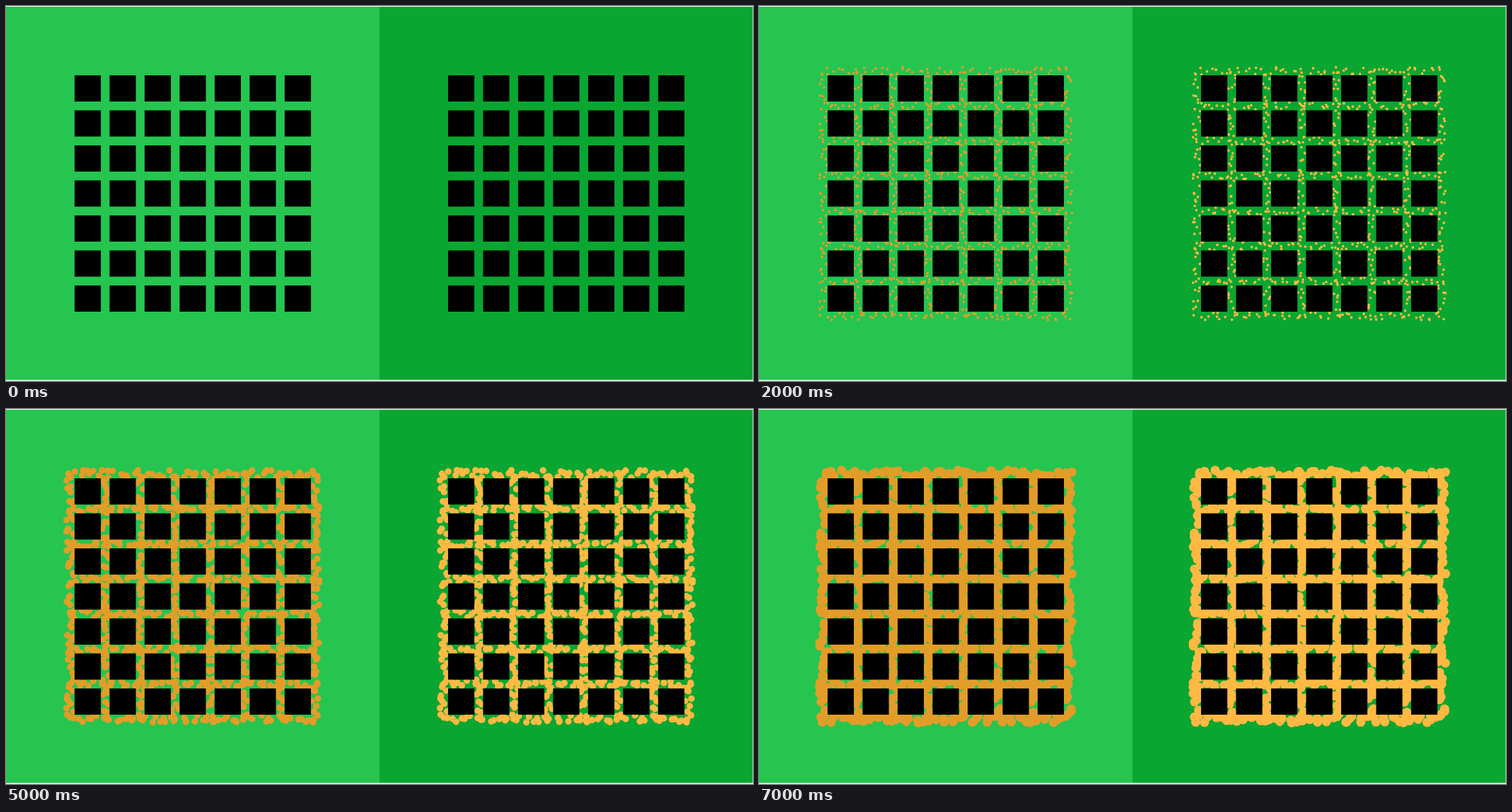
Animation of 1056 by 530 pixels, one loop 8000 ms. Source, as an HTML page:

```html
<!DOCTYPE html>
<html lang="en">
<head>
<meta charset="utf-8">
<title>Dotted grid</title>
<style>
  html, body { margin: 0; width: 100%; height: 100%; overflow: hidden; background: #fff; }
  svg { display: block; width: 100%; height: 100%; }
</style>
</head>
<body>
<svg viewBox="0 0 1056 530">
  <defs>
    <path id="dots" fill="none" stroke-linecap="round"/>
    <path id="squares"/>
  </defs>
  <rect y="1" width="528" height="527.5" fill="#25c550"/>
  <rect x="528" y="1" width="527.5" height="527.5" fill="#09a631"/>
  <use href="#dots" stroke="#e29d29"/>
  <use href="#dots" x="528" stroke="#ffb943"/>
  <use href="#squares"/>
  <use href="#squares" x="528"/>
</svg>
<script>
const CELLS = 7, PITCH = 49.5, SIDE = 37.125;
const LENGTH = CELLS * PITCH;
const LEFT = 264 - LENGTH / 2, TOP = 265 - LENGTH / 2;
const STEP = 1000, STEPS = 8;
const PER_CELL = 9, SPREAD = 5.4, GROWTH = 1.85;

const dots = document.getElementById('dots');
const squares = document.getElementById('squares');

function seeded(seed) {
  return () => {
    seed = (seed + 0x6d2b79f5) | 0;
    let n = Math.imul(seed ^ (seed >>> 15), 1 | seed);
    n = (n + Math.imul(n ^ (n >>> 7), 61 | n)) ^ n;
    return ((n ^ (n >>> 14)) >>> 0) / 4294967296;
  };
}

function squarePath() {
  const inset = (PITCH - SIDE) / 2;
  let d = '';
  for (let row = 0; row < CELLS; row++) {
    for (let col = 0; col < CELLS; col++) {
      const x = LEFT + inset + col * PITCH, y = TOP + inset + row * PITCH;
      d += `M${x} ${y}h${SIDE}v${SIDE}h${-SIDE}z`;
    }
  }
  return d;
}

// Scatter dots along every grid line; zero-length strokes give round dots.
function dotPath(step) {
  const random = seeded(step * 7919);
  const count = CELLS * PER_CELL;
  const jitter = () => (random() * 2 - 1) * SPREAD;
  const dot = (x, y) => `M${(LEFT + x).toFixed(1)} ${(TOP + y).toFixed(1)}h0`;
  let d = '';
  for (let line = 0; line <= CELLS; line++) {
    for (let i = 0; i < count; i++) {
      const along = (i + 0.5) / count * LENGTH;
      d += dot(along + jitter(), line * PITCH + jitter());
      d += dot(line * PITCH + jitter(), along + jitter());
    }
  }
  return d;
}

const paths = Array.from({ length: STEPS }, (_, step) => step ? dotPath(step) : '');
let shown = -1;

function draw(time) {
  const step = Math.floor(time / STEP) % STEPS;
  if (step === shown) return;
  shown = step;
  dots.setAttribute('d', paths[step]);
  dots.setAttribute('stroke-width', step * GROWTH);
}

squares.setAttribute('d', squarePath());
draw(0);
const start = performance.now();
requestAnimationFrame(function tick() {
  draw(performance.now() - start);
  requestAnimationFrame(tick);
});
</script>
</body>
</html>
```
